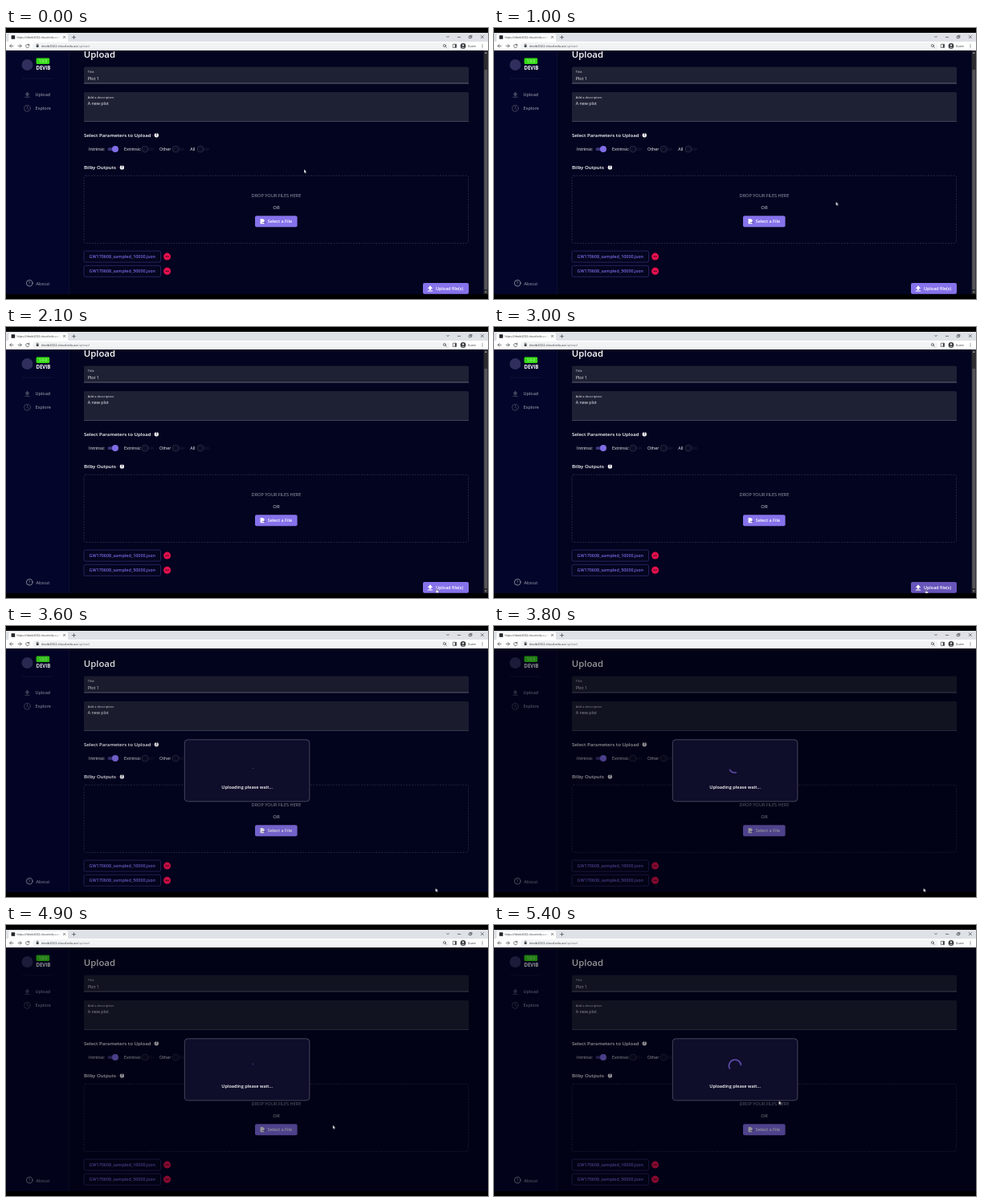
Animation, 600 px wide and 338 px high, one loop 5.5 s. Source, as an HTML page:

```html
<!DOCTYPE html>
<html lang="en">
<head>
<meta charset="utf-8">
<title>Upload</title>
<style>
  html, body { margin: 0; width: 100%; height: 100%; overflow: hidden; background: #000; }
  svg { display: block; width: 100vw; height: 100vh; font-family: "Open Sans", "Noto Sans", sans-serif; }
  text { fill: #fff; }
  .line { fill: none; stroke-linecap: round; stroke-linejoin: round; }
  .head { font-size: 6.1px; font-weight: 600; }
  .label { font-size: 4px; fill: #e4e4ea; }
  .value { font-size: 5.3px; fill: #f0f0f4; }
  .nav { font-size: 5.4px; font-weight: 600; fill: #85869a; }
  .btn { font-size: 5.4px; font-weight: 600; }
  .file { font-size: 5.43px; font-weight: 600; fill: #7b69e4; }
  .mid { text-anchor: middle; }
  .chrome { font-size: 4.05px; fill: #303236; }

  /* The clock below seeks every animation. */
  .scroll, .scene, .bar, .veil, .submit, .cursor, .arrow, .hand { animation: 5500ms linear infinite paused; }
  .scroll { animation-name: scroll; }
  .bar { animation-name: leave; }
  .scene { animation-name: enter; }
  .veil { animation-name: veil; }
  .submit { animation-name: hover; }
  .cursor { animation-name: travel; }
  .hand { animation-name: point; }
  .arrow { animation-name: unpoint; }

  @keyframes scroll {
    0% { transform: translateY(0); animation-timing-function: step-end; }
    65.45%, 100% { transform: translateY(14px); }
  }
  @keyframes leave {
    0% { opacity: 1; animation-timing-function: step-end; }
    65.45%, 100% { opacity: 0; }
  }
  @keyframes enter {
    0% { opacity: 0; animation-timing-function: step-end; }
    65.45%, 100% { opacity: 1; }
  }
  @keyframes veil {
    0%, 64.6% { opacity: 0; }
    65.45% { opacity: .14; }
    67.27% { opacity: .32; }
    69.1%, 100% { opacity: .42; }
  }
  @keyframes hover {
    0%, 38.18% { fill: #8672ea; }
    41.82% { fill: #7764d0; animation-timing-function: step-end; }
    54.54%, 100% { fill: #6855ba; }
  }
  @keyframes point {
    0% { opacity: 0; animation-timing-function: step-end; }
    38.18% { opacity: 1; animation-timing-function: step-end; }
    65.45%, 100% { opacity: 0; }
  }
  @keyframes unpoint {
    0% { opacity: 1; animation-timing-function: step-end; }
    38.18% { opacity: 0; animation-timing-function: step-end; }
    65.45%, 100% { opacity: 1; }
  }
  @keyframes travel {
    0% { transform: translate(371px, 176.3px); }
    10.91% { transform: translate(400.3px, 200.3px); }
    18.18% { transform: translate(425.6px, 216.8px); }
    21.82% { transform: translate(436.5px, 226.3px); }
    32.73% { transform: translate(508.5px, 297.3px); }
    38.18% { transform: translate(534.8px, 326px); }
    41.82% { transform: translate(536px, 327px); animation-timing-function: step-end; }
    54.54% { transform: translate(536.6px, 327.4px); animation-timing-function: step-end; }
    65.45%, 74.55% { transform: translate(534.6px, 327px); }
    80% { transform: translate(517.3px, 310.6px); }
    85.45% { transform: translate(448.3px, 273px); }
    90.91% { transform: translate(386px, 238px); }
    96.36%, 100% { transform: translate(354.6px, 219.3px); }
  }

  .spin { animation: spin 1400ms 3550ms linear infinite paused; }
  .arc { animation: arc 1400ms 3550ms ease-in-out infinite paused; }
  @keyframes spin { to { transform: rotate(360deg); } }
  @keyframes arc {
    0% { stroke-dasharray: 1px, 200px; stroke-dashoffset: 0; }
    50% { stroke-dasharray: 100px, 200px; stroke-dashoffset: -15px; }
    100% { stroke-dasharray: 100px, 200px; stroke-dashoffset: -125px; }
  }
</style>
</head>
<body>
<svg viewBox="0 0 600 338" preserveAspectRatio="none">
  <defs>
    <clipPath id="view"><rect y="28" width="600" height="304"/></clipPath>
    <linearGradient id="fade"><stop offset=".8" stop-color="#fff" stop-opacity="0"/><stop offset="1" stop-color="#fff"/></linearGradient>
    <g id="help">
      <circle r="2.7" fill="#f2f2f6"/>
      <text class="mid" y="1.55" style="font-size:4.4px;font-weight:700;fill:#05061f">?</text>
    </g>
    <g id="off">
      <rect x="-2" y="-1.9" width="13.5" height="3.8" rx="1.9" fill="#0d0e27"/>
      <circle r="4" fill="#0b0c26" stroke="#303149" stroke-width=".8"/>
    </g>
    <g id="up">
      <path d="M0-3.4 3.1.2H1.2V2H-1.2V.2H-3.1ZM-3.1 2.8H3.1V3.8H-3.1Z"/>
    </g>
    <g id="row">
      <rect x="97" y="-7" width="95.5" height="14" rx="1.5" fill="#04051f" stroke="#312b6c" stroke-width=".8"/>
      <circle cx="200.6" r="4.5" fill="#e5104d"/>
      <path d="M198.3 0h4.6" stroke="#4a0823" stroke-width="1"/>
    </g>
  </defs>

  <rect width="600" height="338" fill="#020420"/>

  <g clip-path="url(#view)">
    <g class="scroll">
      <text x="96.7" y="36.8" style="font-size:11.4px;font-weight:600">Upload</text>

      <rect x="97" y="48.5" width="479" height="20.7" rx="1.5" fill="#1e2034"/>
      <path d="M97 69h479M97 116.2h479" stroke="#85869a" stroke-width=".7"/>
      <text class="label" x="101.8" y="56">Title</text>
      <text class="value" x="101.8" y="64.6">Plot 1</text>
      <rect x="97" y="80" width="479" height="36" rx="1.5" fill="#1e2034"/>
      <text class="label" x="101.8" y="87.6">Add a description</text>
      <text class="value" x="101.8" y="96">A new plot</text>

      <text class="head" x="97" y="136.4">Select Parameters to Upload</text>
      <text class="label" x="181" y="135.5" style="fill:#8a1840">*</text>
      <use href="#help" x="187.3" y="133.7"/>
      <g class="value">
        <text x="103" y="153.3">Intrinsic</text>
        <text x="147" y="153.3">Extrinsic</text>
        <text x="191" y="153.3">Other</text>
        <text x="229.3" y="153.3">All</text>
      </g>
      <rect x="126.5" y="149.2" width="13" height="3.8" rx="1.9" fill="#3d347c"/>
      <circle cx="136" cy="151.1" r="4" fill="#806de6"/>
      <use href="#off" x="173" y="151.1"/>
      <use href="#off" x="211.2" y="151.1"/>
      <use href="#off" x="242" y="151.1"/>

      <text class="head" x="97" y="176.2">Bilby Outputs</text>
      <text class="label" x="138.3" y="175.5" style="fill:#8a1840">*</text>
      <use href="#help" x="144.4" y="173.9"/>
      <rect x="97" y="184.2" width="478.6" height="84.2" rx="2" fill="none" stroke="#3c3d55" stroke-width=".7" stroke-dasharray="2 1.5"/>
      <text class="mid" x="336.5" y="211.3" style="font-size:5.6px;font-weight:500;fill:#a3a4b2">DROP YOUR FILES HERE</text>
      <text class="mid" x="336.5" y="226.1" style="font-size:6px;font-weight:600;fill:#a3a4b2">OR</text>
      <rect x="310" y="234.2" width="52.6" height="14" rx="2" fill="#8672ea"/>
      <path d="M316.6 238h3.2l1.8 1.8v4.4h-5Z" fill="#fff"/>
      <path d="M319 242.5h4m-1.3-1.3 1.3 1.3-1.3 1.3" class="line" stroke="#5142a2" stroke-width=".7"/>
      <text class="btn" x="325.7" y="243.2">Select a File</text>

      <use href="#row" y="285.1"/>
      <text class="file" x="103.5" y="287">GW170608_sampled_10000.json</text>
      <use href="#row" y="303.3"/>
      <text class="file" x="103.5" y="305.2">GW170608_sampled_50000.json</text>

      <rect class="submit" x="519" y="318" width="57" height="13.8" rx="2"/>
      <use href="#up" x="528" y="324.7" fill="#fff"/>
      <text class="btn" x="535" y="326.7">Upload file(s)</text>
    </g>

    <g class="bar">
      <rect x="594.6" y="28" width="5.4" height="304" fill="#2b2b30"/>
      <rect x="595.4" y="52" width="3.8" height="274" fill="#55555b"/>
      <path d="M595.9 32 597.3 29.8 598.7 32ZM595.9 328.6 597.3 330.6 598.7 328.6Z" fill="#a0a0a4"/>
    </g>

    <rect y="28" width="78.5" height="304" fill="#04052a"/>
    <path d="M78.7 28v304" stroke="#17183a" stroke-width=".7"/>
    <circle cx="26.5" cy="46" r="7" fill="#302e5c"/>
    <rect x="37.6" y="37.6" width="16.6" height="7.4" rx="1.4" fill="#34da15"/>
    <text class="mid" x="45.9" y="43" style="font-size:4.6px;fill:#d5ffc9">1.0.0</text>
    <text x="37.4" y="52.2" style="font-size:6.1px;font-weight:700">DEVIB</text>
    <path d="M20 63h38" stroke="#15173a" stroke-width=".7"/>
    <use href="#up" x="26.5" y="83" fill="#45465f"/>
    <text class="nav" x="36.5" y="85.2">Upload</text>
    <g class="line" stroke="#45465f" stroke-width=".9">
      <circle cx="26.5" cy="100.2" r="4"/>
      <path d="M26.5 97.6v2.8l1.9 1.2"/>
    </g>
    <text class="nav" x="36.5" y="102.4">Explore</text>
    <circle cx="29.2" cy="318.2" r="3.8" class="line" stroke="#a3a4b2" stroke-width=".8"/>
    <text class="mid" x="29.2" y="320.2" style="font-size:5.4px;fill:#a3a4b2">?</text>
    <text x="37.2" y="320.5" style="font-size:6.1px;fill:#a3a4b2">About</text>

    <rect class="veil" y="28" width="600" height="304" fill="#000008"/>

    <g class="scene">
      <rect x="222.3" y="141.8" width="155.6" height="77" rx="4" fill="#0e0d2a" stroke="#55566c" stroke-width=".8"/>
      <g transform="translate(300 175.5) scale(.37)">
        <g class="spin"><circle class="arc" r="20.2" fill="none" stroke="#7664d6" stroke-width="3.6"/></g>
      </g>
      <text class="mid" x="300.2" y="203.1" style="font-size:5.57px;font-weight:600">Uploading please wait...</text>
    </g>
  </g>

  <rect y="6" width="600" height="11" fill="#dee1e6"/>
  <rect y="17" width="600" height="11" fill="#fff"/>
  <path d="M2 17.2q1.4 0 1.4-1.6V9.2q0-1.6 1.6-1.6H75.4q1.6 0 1.6 1.6v6.4q0 1.6 1.4 1.6Z" fill="#fff"/>
  <rect x="6.6" y="9.2" width="4.6" height="4.6" fill="#24262a"/>
  <text class="chrome" x="13.4" y="12.9" style="font-size:3.55px">https://devib2022.cloud.edu.au/u</text>
  <rect x="13" y="8.5" width="56" height="7" fill="url(#fade)"/>
  <rect x="33" y="18.2" width="520" height="8.6" rx="4.3" fill="#f1f3f4"/>
  <text class="chrome" x="44" y="23.9">devib2022.cloud.edu.au<tspan fill="#777a7f">/upload</tspan></text>
  <text class="chrome" x="574.8" y="23.8" style="font-size:3.7px">Guest</text>
  <g class="line" stroke="#45484d" stroke-width=".7">
    <path d="M71.4 10.2l2.4 2.4m0-2.4-2.4 2.4M84.5 9.6v4m-2-2h4"/>
    <path d="M548.5 10.3l1.5 1.5 1.5-1.5M562.3 11.4h3.4M591.2 9.5l3.2 3.2m0-3.2-3.2 3.2"/>
    <path d="M576.6 10.3h2.4v2.4h-2.4ZM577.5 10.2v-.8h2.4v2.4h-.8"/>
    <path d="M9 22.4H4.8m2-2-2 2 2 2M15 22.4h4.2m-2-2 2 2-2 2"/>
    <path d="M28.7 21.3A2.2 2.2 0 1 0 29 23M28.9 20v1.5h-1.5"/>
    <circle cx="545.8" cy="22" r="1.5"/>
    <path d="M547 23.2l1.2 1.2M38.3 21.6v-.8a.9.9 0 0 1 1.8 0v.8"/>
    <path d="M556.6 20.2h4v4.2h-4Z"/>
  </g>
  <g fill="#3c4043">
    <rect x="37.8" y="21.4" width="2.8" height="2.6" rx=".3"/>
    <rect x="558.8" y="20.2" width="1.8" height="4.2"/>
    <circle cx="569" cy="22.4" r="3.4"/>
    <circle cx="593" cy="20.7" r=".5"/><circle cx="593" cy="22.4" r=".5"/><circle cx="593" cy="24.1" r=".5"/>
  </g>
  <circle cx="569" cy="21.5" r="1.1" fill="#fff"/>
  <path d="M566.9 24.6a2.3 1.5 0 0 1 4.2 0Z" fill="#fff"/>

  <g class="cursor">
    <path class="arrow" d="M0 0V4.6L1.1 3.6 1.8 5.2 2.6 4.8 1.9 3.3H3.3Z" fill="#fff" stroke="#15161f" stroke-width=".25"/>
    <path class="hand" d="M.6.4Q1.1-.2 1.5.4V2.2L3.4 2.7Q4 2.9 3.8 3.6L3.3 5.6H1.1L-.5 3.6Q-.3 2.9.6 3.6Z" fill="#fff" stroke="#15161f" stroke-width=".3"/>
  </g>

  <path d="M0 0H600V6H0ZM0 332H600V338H0Z" fill="#000"/>
</svg>
<script>
  const LOOP = 5500, STEP = 100;
  const motions = document.getAnimations();
  const start = performance.now();

  function tick() {
    const t = (performance.now() - start) % LOOP;
    const held = Math.floor(t / STEP) * STEP;
    for (const m of motions) m.currentTime = held;
    requestAnimationFrame(tick);
  }
  tick();
</script>
</body>
</html>
```
